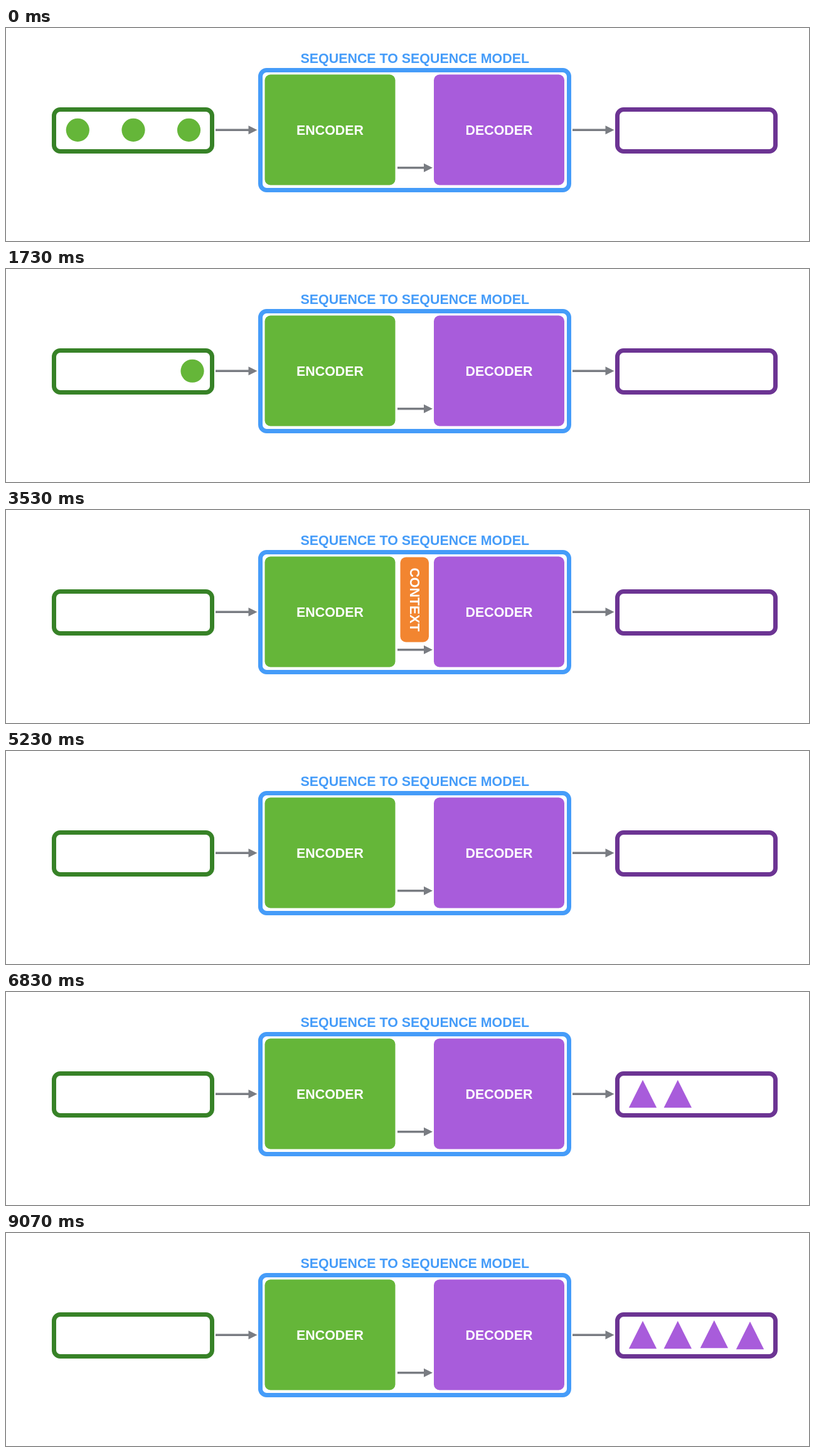
Recreate the animation shown at these times as an HTML page. Size 1280 by 341 pixels, loop 9110 ms.

```html
<!DOCTYPE html>
<html lang="en">
<head>
<meta charset="utf-8">
<title>Sequence to sequence model</title>
<style>
  html, body { margin: 0; width: 100%; height: 100%; overflow: hidden; background: #fff; }
  svg { display: block; width: 100%; height: 100%; }
  text { font: bold 21.4px "Liberation Sans", Arial, sans-serif; text-anchor: middle; fill: #fff; }
  .frame { fill: none; stroke-width: 7; }
  .arrow path { fill: #797c82; }
  .arrow line { stroke: #797c82; stroke-width: 3.6; }
</style>
</head>
<body>
<svg viewBox="0 0 1280 341">
  <text x="651.8" y="56.2" style="fill:#459cf9">SEQUENCE TO SEQUENCE MODEL</text>
  <rect class="frame" x="76.5" y="130.5" width="252" height="67" rx="10" stroke="#378227"/>
  <rect class="frame" x="974.5" y="130.5" width="252" height="67" rx="10" stroke="#6c3493"/>
  <rect class="frame" x="405.5" y="67.5" width="492" height="192" rx="10" stroke="#459cf9"/>
  <g id="arrows"></g>
  <g id="circles" fill="#65b639"></g>
  <g id="triangles" fill="#a85cdb"></g>
  <g id="context">
    <rect x="628.5" y="75.5" width="45.5" height="136" rx="9" fill="#f28530"/>
    <text transform="translate(643.6 143.5) rotate(90)">CONTEXT</text>
  </g>
  <g id="encoder">
    <rect x="412.5" y="74.5" width="208" height="177" rx="9" fill="#65b639"/>
    <text x="516.5" y="170.6">ENCODER</text>
  </g>
  <g id="decoder">
    <rect x="682" y="74.5" width="208" height="177" rx="9" fill="#a85cdb"/>
    <text x="786" y="170.6">DECODER</text>
  </g>
</svg>
<script>
  const LOOP = 9110, MOVE = 550, PULSE = 250, DEPTH = 0.036;
  const ENCODER = { x: 516.5, y: 161 }, DECODER = { x: 786, y: 163 };
  const $ = id => document.getElementById(id);

  function add(parent, tag, attrs) {
    const el = document.createElementNS("http://www.w3.org/2000/svg", tag);
    for (const key in attrs) el.setAttribute(key, attrs[key]);
    return parent.appendChild(el);
  }

  function arrow(x1, x2, y) {
    const g = add($("arrows"), "g", { class: "arrow" });
    add(g, "line", { x1, y1: y, x2: x2 - 12, y2: y });
    add(g, "path", { d: `M${x2} ${y}l-14 -7v14z` });
  }
  arrow(334, 400.5, 163.3);
  arrow(624, 680, 223.8);
  arrow(903, 969.5, 163.3);

  const circles = [114.3, 203, 291.5].map((x, i) => ({
    from: { x, y: 163.3 }, to: ENCODER, start: 20 + 825 * i,
    el: add($("circles"), "circle", { r: 18.6 })
  }));

  const triangles = [[1015, 163], [1070.8, 163], [1128.8, 162], [1186, 164]].map(([x, y], i) => ({
    from: DECODER, to: { x, y }, start: 5020 + 840 * i,
    el: add($("triangles"), "path", { d: "M0 -22.3L22.2 22.2H-22.2Z" })
  }));

  const clamp = v => Math.max(0, Math.min(1, v));
  const progress = (t, start, length) => {
    const p = clamp((t - start) / length);
    return p < 0.5 ? 2 * p * p : 1 - 2 * (1 - p) * (1 - p);
  };
  const show = (el, on) => el.setAttribute("visibility", on ? "visible" : "hidden");

  function place(item, t) {
    const p = progress(t, item.start, MOVE), { from, to } = item;
    const x = from.x + (to.x - from.x) * p, y = from.y + (to.y - from.y) * p;
    item.el.setAttribute("transform", `translate(${x} ${y})`);
  }

  function pulse(el, cx, t, starts) {
    const cy = 163;
    const dip = starts.reduce((sum, s) => sum + Math.sin(Math.PI * clamp((t - s) / PULSE)), 0);
    el.setAttribute("transform",
      `translate(${cx} ${cy}) scale(${1 - DEPTH * dip}) translate(${-cx} ${-cy})`);
  }

  const encoderPulses = circles.map(c => c.start + MOVE);
  const decoderPulses = triangles.map(s => s.start - PULSE);

  function draw(t) {
    for (const c of circles) {
      place(c, t);
      show(c.el, t < c.start + MOVE);
    }
    for (const s of triangles) {
      place(s, t);
      show(s.el, t >= s.start);
    }
    pulse($("encoder"), ENCODER.x, t, encoderPulses);
    pulse($("decoder"), DECODER.x, t, decoderPulses);

    // The context slides out of the encoder, rests, then slides into the decoder.
    const shift = 62 * (progress(t, 2900, 500) - 1 + progress(t, 4150, 500));
    $("context").setAttribute("transform", `translate(${shift} 0)`);
    show($("context"), t > 2900 && t < 4650);
  }

  const begin = performance.now();
  function tick() {
    draw((performance.now() - begin) % LOOP);
    requestAnimationFrame(tick);
  }
  draw(0);
  requestAnimationFrame(tick);
</script>
</body>
</html>
```
